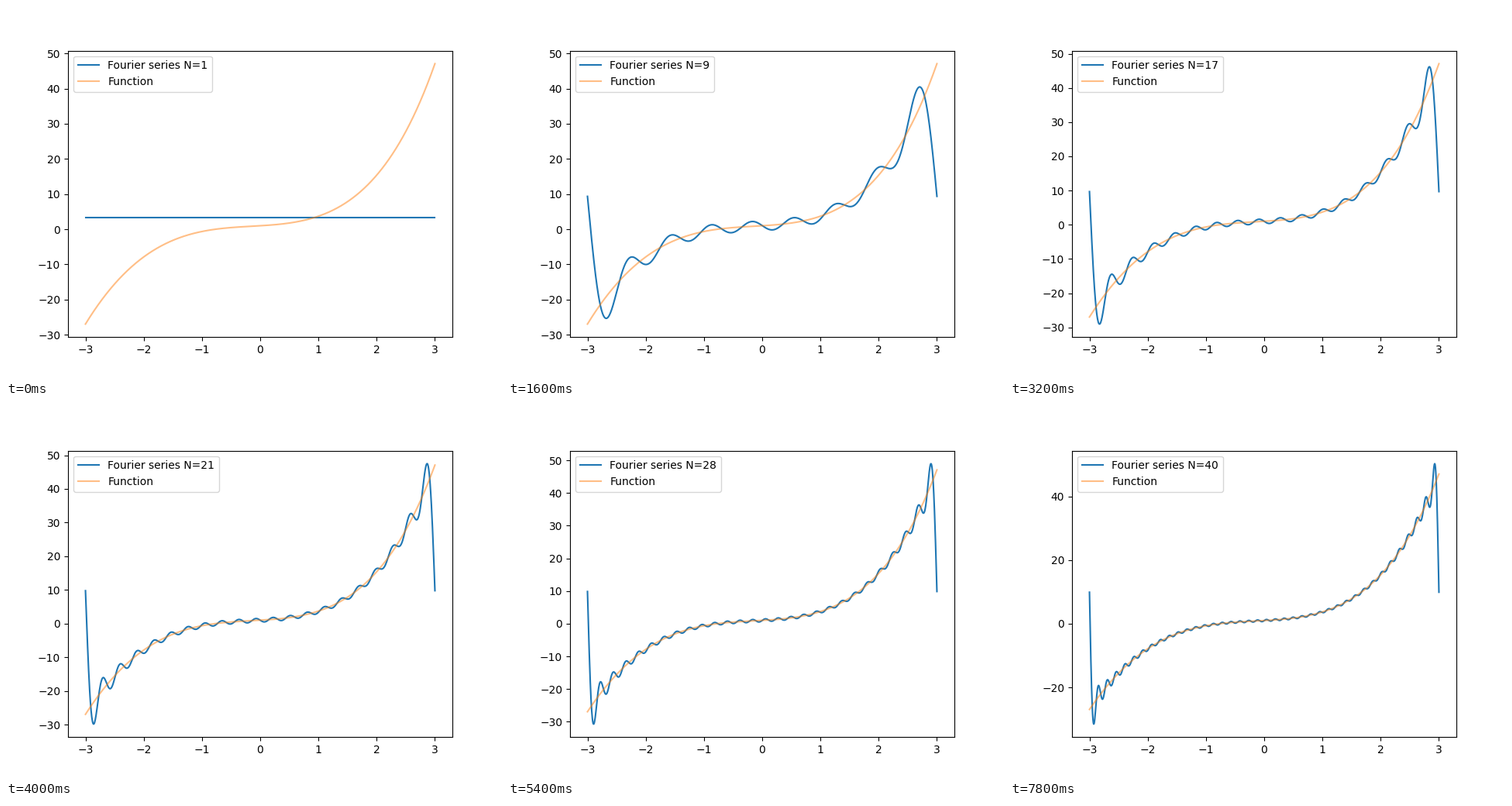
Recreate the animation shown at these times as a matplotlib script. Size 640x480 px, loop 8 s.

```python
import numpy as np
import matplotlib.pyplot as plt
from matplotlib.animation import FuncAnimation

L = 3
TERMS = 40
x = np.linspace(-L, L, 1000)
curve = np.exp(x) + x**3


def harmonic(n):
    """n-th Fourier term of exp(x) + x^3 on [-L, L]."""
    if n == 0:
        return np.full_like(x, np.sinh(L) / L)
    k = n * np.pi / L
    sign = (-1) ** n
    expo = 2 * sign * np.sinh(L) / (L * (1 + k**2))
    cubic = 2 * sign * (6 / k**3 - L**2 / k)
    return expo * np.cos(k * x) + (cubic - k * expo) * np.sin(k * x)


partial = np.cumsum([harmonic(n) for n in range(TERMS)], axis=0)

fig, ax = plt.subplots(figsize=(6.4, 4.8), dpi=100)


def draw(i):
    ax.clear()
    ax.plot(x, partial[i], label=f"Fourier series N={i + 1}")
    ax.plot(x, curve, alpha=0.5, label="Function")
    ax.legend(loc="upper left")
    return ax.lines


anim = FuncAnimation(fig, draw, frames=TERMS, init_func=lambda: draw(0),
                     interval=200, repeat=True, repeat_delay=0)
plt.show()
```
